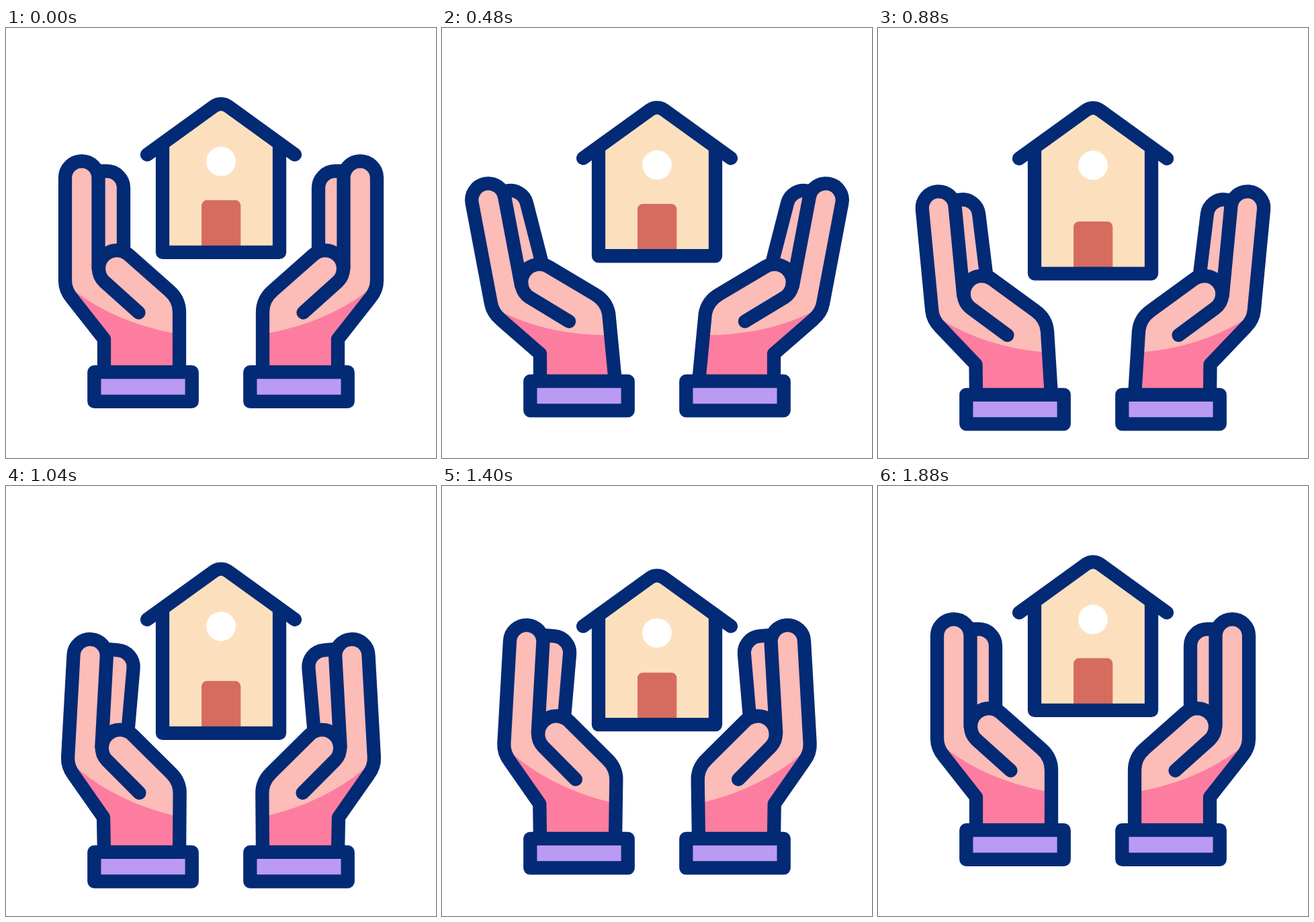
These frames come from a looping animation (640x640 px, 1.96 s). An HTML page with a canvas:

```html
<!DOCTYPE html>
<html lang="en">
<head>
<meta charset="utf-8">
<title>House between two hands</title>
<style>
  html, body { margin: 0; width: 100%; height: 100%; overflow: hidden; background: #fff; }
  canvas { display: block; width: 100vmin; height: 100vmin; margin: 0 auto; }
</style>
</head>
<body>
<canvas id="stage" width="640" height="640"></canvas>
<script>
const ctx = document.getElementById('stage').getContext('2d');
const LOOP = 1960, STEP = 40;
const NAVY = '#032a75', SKIN = '#fcbcb8', SHADE = '#fd7da0', CUFF = '#bb9af3',
      WALL = '#fce0be', DOOR = '#d66c5e';
const PIVOT = [191, 463], KNUCKLE = [175, 345];
const RAD = Math.PI / 180;

// Symmetric ease: cubic-bezier(.5, 0, .5, 1)
function ease(x) {
  let lo = 0, hi = 1;
  for (let i = 0; i < 24; i++) {
    const s = (lo + hi) / 2, r = 1 - s;
    if (1.5 * s * r * r + 1.5 * s * s * r + s * s * s < x) lo = s; else hi = s;
  }
  return lo * lo * (3 - 2 * lo);
}

// Keys are [time, value] pairs
function track(keys, t, fn = v => v) {
  if (t <= keys[0][0]) return fn(keys[0][1]);
  for (let i = 1; i < keys.length; i++) {
    const [t0, a] = keys[i - 1], [t1, b] = keys[i];
    if (t < t1) return fn(a) + (fn(b) - fn(a)) * ease((t - t0) / (t1 - t0));
  }
  return fn(keys[keys.length - 1][1]);
}

const DROP = [[120, 0], [920, 33.7], [1772, 0]];
const TILT = [[120, 0], [640, 12.9], [1160, -4.7], [1760, 0]];
const FAN = [[120, 0], [640, 4.4], [1160, -2.4], [1760, 0]];
const SWAY = [[120, 0], [640, -1.2], [1160, -1.2], [1760, 0]];
const BASE = [[240, 0], [1040, 34], [1870, 0]];
const STRETCH = [[470, 0], [900, 26], [1500, 0]];

function paint(fill) {
  if (fill) { ctx.fillStyle = fill; ctx.fill(); }
  ctx.stroke();
}

function bend(cos, sin, [x, y]) {
  ctx.translate(x, y);
  ctx.transform(cos, -sin, sin, cos, 0, 0);
  ctx.translate(-x, -y);
}

// Runs build() in the bent space; the path stays, the pen keeps its width
function bent(pose, build) {
  ctx.save();
  ctx.translate(pose.sway, 0);
  bend(pose.cos, pose.sin, PIVOT);
  build();
  ctx.restore();
}

function backFinger(pose) {
  ctx.beginPath();
  bent(pose, () => {
    bend(Math.cos(pose.fan), Math.sin(pose.fan), KNUCKLE);
    ctx.moveTo(122, 213);
    ctx.lineTo(150, 213);
    ctx.arcTo(175, 213, 175, 238, 25);
    ctx.lineTo(175, 345);
    ctx.lineTo(122, 345);
  });
  paint(SKIN);
}

function handPath(pose) {
  ctx.beginPath();
  ctx.moveTo(146, 514);
  bent(pose, () => {
    ctx.lineTo(146, 463);
    ctx.lineTo(98, 402);
    ctx.quadraticCurveTo(88, 390, 88, 376);
    ctx.lineTo(88, 223);
    ctx.arc(112.75, 223, 24.75, Math.PI, 0);
    ctx.lineTo(137.5, 358);
    ctx.arc(165, 358, 27, Math.PI, -0.846);
    ctx.lineTo(243, 391);
    ctx.quadraticCurveTo(258, 404, 258, 423);
  });
  ctx.lineTo(258, 514);
}

function hand(pose) {
  backFinger(pose);

  handPath(pose);
  ctx.fillStyle = SKIN;
  ctx.fill();

  ctx.save();
  ctx.clip();
  ctx.beginPath();
  bent(pose, () => {
    ctx.moveTo(88, 380);
    ctx.lineTo(104, 393);
    ctx.quadraticCurveTo(165, 438, 248, 454);
    ctx.lineTo(280, 459);
  });
  ctx.lineTo(280, 530);
  ctx.lineTo(60, 530);
  ctx.fillStyle = SHADE;
  ctx.fill();
  ctx.restore();

  handPath(pose);
  paint();

  ctx.beginPath();
  bent(pose, () => {
    ctx.arc(165, 358, 27, Math.PI, 2.33, true);
    ctx.lineTo(197.5, 423.5);
  });
  paint();

  ctx.beginPath();
  ctx.rect(131.3, 512.2, 145.4, 43.6);
  paint(CUFF);
}

function house(base, roof) {
  ctx.beginPath();
  ctx.moveTo(233, 174 + roof);
  ctx.lineTo(320, 113 + roof);
  ctx.lineTo(407, 174 + roof);
  ctx.lineTo(407, 334 + base);
  ctx.lineTo(233, 334 + base);
  ctx.closePath();
  ctx.fillStyle = WALL;
  ctx.fill();

  ctx.beginPath();
  ctx.arc(320, 198.5 + roof, 21.9, 0, 2 * Math.PI);
  ctx.fillStyle = '#fff';
  ctx.fill();

  ctx.beginPath();
  ctx.roundRect(291, 256.3 + base, 58.3, 78, [8, 8, 0, 0]);
  ctx.fillStyle = DOOR;
  ctx.fill();

  ctx.beginPath();
  ctx.moveTo(233, 176 + roof);
  ctx.lineTo(233, 333.8 + base);
  ctx.lineTo(407, 333.8 + base);
  ctx.lineTo(407, 176 + roof);
  paint();

  ctx.beginPath();
  ctx.moveTo(210, 188.4 + roof);
  ctx.arcTo(320, 109 + roof, 430, 188.4 + roof, 18);
  ctx.lineTo(430, 188.4 + roof);
  paint();
}

function draw(t) {
  ctx.setTransform(1, 0, 0, 1, 0, 0);
  ctx.fillStyle = '#fff';
  ctx.fillRect(0, 0, 640, 640);
  ctx.strokeStyle = NAVY;
  ctx.lineWidth = 20.3;
  ctx.lineCap = ctx.lineJoin = 'round';

  const base = track(BASE, t);
  house(base, base - track(STRETCH, t));

  const drop = track(DROP, t);
  const pose = {
    cos: track(TILT, t, d => Math.cos(d * RAD)),
    sin: track(TILT, t, d => Math.sin(d * RAD)),
    fan: track(FAN, t) * RAD,
    sway: track(SWAY, t)
  };
  for (const side of [1, -1]) {
    ctx.setTransform(side, 0, 0, 1, side < 0 ? 640 : 0, drop);
    hand(pose);
  }
}

const start = performance.now();
function tick() {
  const t = (performance.now() - start) % LOOP;
  draw(Math.floor(t / STEP) * STEP);
  requestAnimationFrame(tick);
}
tick();
</script>
</body>
</html>
```
